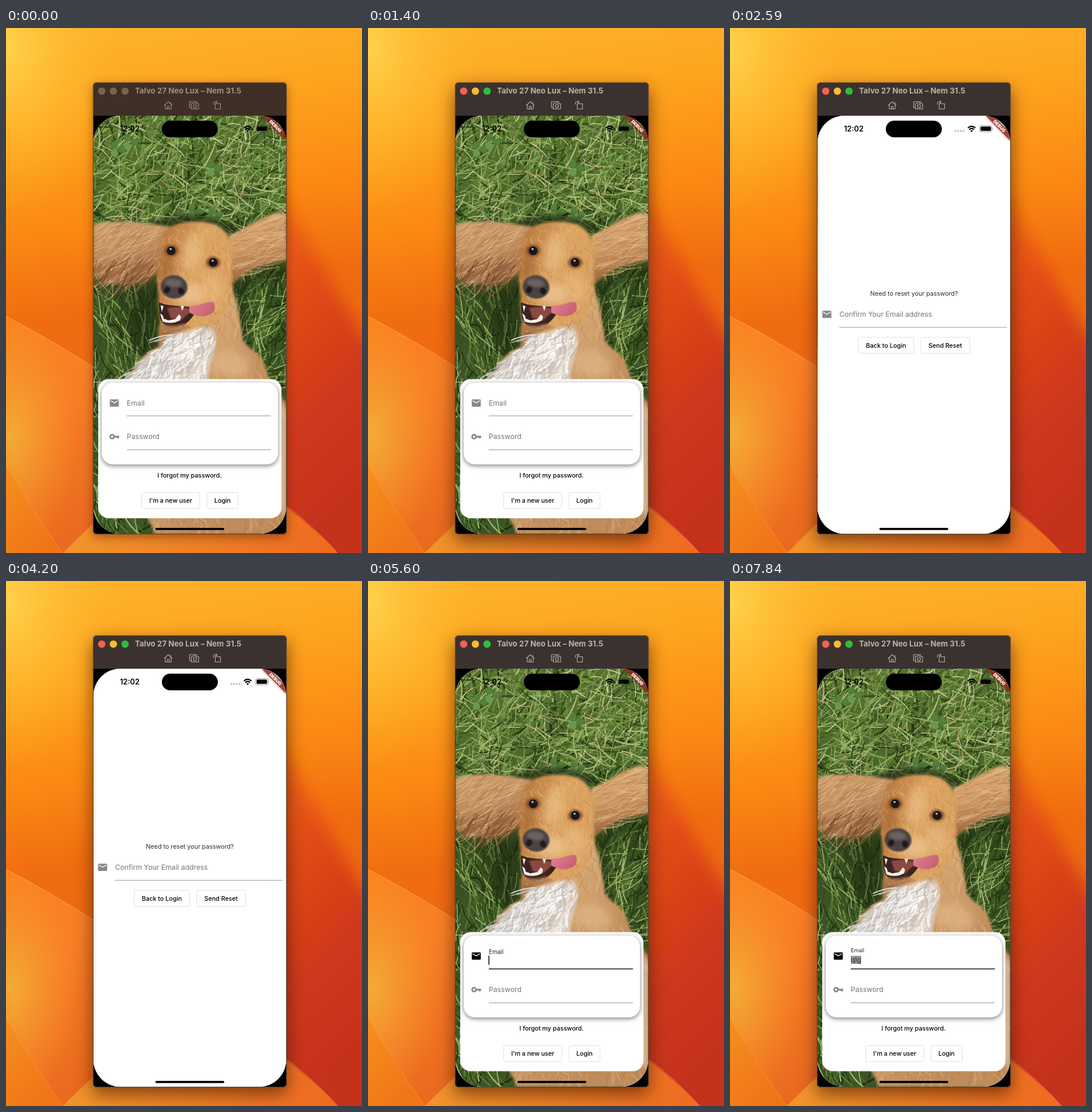
An HTML page with a canvas that plays this animation: 610 by 898 pixels, repeating every 8000 ms.

```html
<!DOCTYPE html>
<html lang="en">
<head>
<meta charset="utf-8">
<title>Login demo</title>
<style>
  html, body { margin: 0; width: 100%; height: 100%; overflow: hidden; background: #f58a18; }
  body { font-family: Inter, Roboto, sans-serif; }
  svg, canvas, div { position: absolute; display: block; left: 0; top: 0; }
  #win { left: 149px; top: 93px; width: 332px; height: 773px; border-radius: 7px; background: #000; overflow: hidden; }
  #screen { left: 1px; top: 57px; width: 330px; height: 715px; border-radius: 46px; overflow: hidden; background: #fff; }
  .page { width: 330px; height: 715px; background: #fff; }
  .field { font-size: 12.1px; fill: #757575; }
  .btn { font-size: 10.6px; font-weight: 500; text-anchor: middle; }
  .box { fill: #fff; stroke: #e0e0e0; }
  .line { stroke: #979797; }
  .card { fill: #fff; filter: drop-shadow(0 3px 3px #0004) drop-shadow(0 1px 4px #0004); }
</style>
</head>
<body>
<svg id="wall" width="610" height="898">
  <defs>
    <linearGradient id="sky" x2=".12" y2="1">
      <stop stop-color="#fdb630"/><stop offset=".2" stop-color="#fea41e"/>
      <stop offset=".4" stop-color="#fb8813"/><stop offset=".56" stop-color="#f06c10"/><stop offset="1" stop-color="#e8601a"/>
    </linearGradient>
    <radialGradient id="sun" cx="0" cy=".04" r=".32">
      <stop stop-color="#ffd24a"/><stop offset="1" stop-color="#ffb52a" stop-opacity="0"/>
    </radialGradient>
    <linearGradient id="red" x2=".3" y2="1">
      <stop stop-color="#f98511"/><stop offset=".2" stop-color="#f26a10"/><stop offset=".42" stop-color="#e34d16"/>
      <stop offset=".7" stop-color="#d03a1a"/><stop offset="1" stop-color="#c4311c"/>
    </linearGradient>
    <linearGradient id="fold" x1=".1" x2=".55" y2="1">
      <stop stop-color="#fa8420"/><stop offset=".4" stop-color="#f87e26"/><stop offset="1" stop-color="#e8671e"/>
    </linearGradient>
    <radialGradient id="glow" cx=".02" cy=".5" r=".5">
      <stop stop-color="#f3ac36"/><stop offset="1" stop-color="#f59a2c" stop-opacity="0"/>
    </radialGradient>
    <linearGradient id="petal" x2=".6" y2="1">
      <stop stop-color="#f6911e"/><stop offset="1" stop-color="#f07418"/>
    </linearGradient>
    <linearGradient id="foot" x2="1">
      <stop stop-color="#f2952c"/><stop offset="1" stop-color="#ee6a20"/>
    </linearGradient>
    <filter id="soft" x="-20%" y="-20%" width="140%" height="140%"><feGaussianBlur stdDeviation="14"/></filter>
  </defs>
  <path fill="url(#sky)" d="M0 0H610V898H0z"/>
  <path fill="url(#sun)" d="M0 0H610V898H0z"/>
  <path fill="url(#red)" filter="url(#soft)" d="M420 180C500 330 560 450 640 565V930H420z"/>
  <path fill="url(#fold)" d="M0 493Q80 535 150 580H240V898H0z"/>
  <path fill="url(#glow)" d="M0 493Q80 535 150 580H240V898H0z"/>
  <path fill="none" stroke="#fbb765" stroke-opacity=".7" d="M0 493Q80 535 150 580"/>
  <path fill="url(#foot)" d="M97 898L240 760H400Q515 840 568 898z"/>
  <path fill="none" stroke="#f98b3c" d="M475 813Q530 855 568 898"/>
  <path fill="url(#petal)" stroke="#f9a640" stroke-opacity=".6" d="M-2 743C30 800 70 860 98 899H-2z"/>
</svg>

<div id="win">
  <svg width="332" height="57" viewBox="149 93 332 57">
    <path fill="#3f2f26" d="M149 93H481V150H149z"/>
    <path class="active" fill="#3b322f" d="M149 93H481V150H149z"/>
    <g fill="#7c6150"><circle cx="164" cy="108" r="6.200"/><circle cx="184" cy="108" r="6.200"/><circle cx="204" cy="108" r="6.200"/></g>
    <g class="active"><circle cx="164" cy="108" r="6.200" fill="#f95f50"/><circle cx="184" cy="108" r="6.200" fill="#fdbb2d"/><circle cx="204" cy="108" r="6.200" fill="#2bbf3c"/></g>
    <g id="bar">
      <text x="221" y="112" font-size="13.200" font-weight="700" fill="#bbb2ad">Talvo 27 Neo Lux – Nem 31.5</text>
      <g fill="none" stroke="#b9afa9" stroke-width="1.1">
        <path d="M271 132.500L278 126L285 132.500M273 131.500V138.500H283V131.500M276.500 138V134H279.500V138M282.500 127V129.500"/>
        <path d="M317 136H314.500V126H327V128M317.500 129.500H320L321 128H325L326 129.500H330V138.500H317.500z"/>
        <circle cx="323.700" cy="133.700" r="2.700"/>
        <path d="M358.500 129.500H367.500V138.500H358.500zM355.500 131V128Q355.500 126.500 357.500 126.500H361M359.500 124.500L361.500 126.500L359.500 128.500"/>
      </g>
    </g>
  </svg>

  <div id="screen">
    <div class="page" id="reset">
      <svg width="330" height="715" viewBox="150 150 330 715">
        <text x="315" y="457.500" text-anchor="middle" font-size="10.600" fill="#2b2b2b">Need to reset your password?</text>
        <use href="#mail" x="-20" y="-151.700" fill="#8b8787"/>
        <text class="field" x="187" y="493.500">Confirm Your Email address</text>
        <path class="line" d="M187 512H474"/>
        <rect class="box" x="219.500" y="529" width="95" height="27.500" rx="2.500"/>
        <rect class="box" x="326.500" y="529" width="84" height="27.500" rx="2.500"/>
        <text class="btn" x="267" y="546.500">Back to Login</text>
        <text class="btn" x="368.500" y="546.500">Send Reset</text>
      </svg>
    </div>

    <div class="page" id="login">
      <canvas id="photo" width="330" height="715"></canvas>
      <svg width="330" height="715" viewBox="150 150 330 715">
        <defs>
          <path id="mail" d="M179.300 635.200H191.800Q193.300 635.200 193.300 636.700V646.200Q193.300 647.700 191.800 647.700H179.300Q177.800 647.700 177.800 646.200V636.700Q177.800 635.200 179.300 635.200zM179.300 638.200L185.500 642.100L191.800 638.200V636.700L185.500 640.600L179.300 636.700z" fill-rule="evenodd"/>
          <clipPath id="tap"><rect x="247" y="751" width="136" height="28" rx="2.500"/></clipPath>
        </defs>
        <path stroke="#ded8cc" d="M150 605.500H480"/>
        <rect x="158" y="600.500" width="314" height="238" rx="18" fill="#fff"/>
        <rect class="card" x="164" y="606.500" width="302" height="140" rx="19"/>
        <use id="mailIcon" href="#mail"/>
        <path fill="none" stroke="#8b8787" stroke-width="2.800" d="M186 699H194M191.500 699V702"/>
        <circle cx="181.800" cy="699" r="3.300" fill="none" stroke="#8b8787" stroke-width="2.800"/>
        <rect id="sel" x="207" y="641" height="14" fill="#999"/>
        <text id="label" x="207">Email</text>
        <text id="typed" x="207" y="652" font-size="12.100" fill="#2e2e2e"></text>
        <rect id="caret" y="641" width="1.500" height="15.500"/>
        <path id="under" d="M207 663.500H454"/>
        <text class="field" x="207" y="703">Password</text>
        <path class="line" d="M207 721.500H454"/>
        <circle id="ripple" cx="307" cy="765" fill="#dfe1e2" clip-path="url(#tap)"/>
        <text class="btn" x="314.500" y="769">I forgot my password.</text>
        <rect class="box" x="232.500" y="794.500" width="99.500" height="27.500" rx="2.500"/>
        <rect class="box" x="344.500" y="794.500" width="53" height="27.500" rx="2.500"/>
        <text class="btn" x="282.300" y="812">I'm a new user</text>
        <text class="btn" x="371" y="812">Login</text>
      </svg>
    </div>

    <svg style="z-index:3" width="330" height="715" viewBox="150 150 330 715">
      <text x="212" y="177.300" text-anchor="middle" font-size="12.700" font-weight="600">12:02</text>
      <rect x="267" y="158.500" width="96" height="28.500" rx="14.250"/>
      <g fill="#8888"><circle cx="385.700" cy="176" r="1.700"/><circle cx="390.500" cy="176" r="1.700"/><circle cx="395.300" cy="176" r="1.700"/><circle cx="400" cy="176" r="1.700"/></g>
      <path fill="none" stroke="#000" stroke-width="2.100" d="M407.500 171Q414 165.200 420.500 171M409.800 173.700Q414 170 418.200 173.700"/>
      <path d="M411.800 175.700Q414 173.800 416.200 175.700L414 178z"/>
      <rect x="427.500" y="166.800" width="21.500" height="11" rx="3.300" fill="none" stroke="#0006"/>
      <rect x="429.300" y="168.600" width="18" height="7.500" rx="1.800"/>
      <path fill="#0006" d="M450 170.500Q451.500 172.300 450 174z"/>
      <path fill="#a52c20cc" style="filter:drop-shadow(0 0 2px #0008)" d="M438 150H451L480 179V193z"/>
      <text transform="translate(461.800 167.800) rotate(45)" y="2.800" text-anchor="middle" font-size="7.600" font-weight="900" fill="#fff">DEBUG</text>
      <rect x="256" y="855" width="118" height="3.800" rx="1.900"/>
    </svg>
  </div>
  <svg width="332" height="773"><rect x=".5" y=".5" width="331" height="772" rx="6.500" fill="none" stroke="#75563a" stroke-opacity=".8"/></svg>
</div>

<script>
const $ = id => document.getElementById(id);
const clamp = x => Math.max(0, Math.min(1, x));

// ---- photo: grass, then the dog from furred shapes ----
const ctx = $('photo').getContext('2d');
let seed = 11;
const rnd = () => (seed = seed * 16807 % 2147483647) / 2147483647;

// Curved hairs or blades; with a path given, only those rooted inside it.
function strands(n, [x, y, w, h], colors, len, angle, spread, width = 1.2, path) {
  for (let i = 0; i < n; i++) {
    const a = angle + (rnd() - .5) * spread, l = len * (.4 + rnd());
    const px = x + rnd() * w, py = y + rnd() * h, bend = (rnd() - .5) * l * .4;
    if (path && !ctx.isPointInPath(path, px - 150, py - 150)) continue;
    const dx = Math.cos(a) * l, dy = Math.sin(a) * l;
    ctx.beginPath();
    ctx.moveTo(px, py);
    ctx.quadraticCurveTo(px + dx / 2 - dy / l * bend, py + dy / 2 + dx / l * bend, px + dx, py + dy);
    ctx.strokeStyle = colors[i % colors.length];
    ctx.lineWidth = width * (.5 + rnd());
    ctx.stroke();
  }
}
function shape(d, fill, blur = 0) {
  ctx.filter = blur ? `blur(${blur}px)` : 'none';
  ctx.fillStyle = fill;
  ctx.fill(new Path2D(d));
  ctx.filter = 'none';
}
function fur(d, fill, alpha, ...hair) {
  shape(d, fill, 2);
  ctx.globalAlpha = alpha;
  strands(...hair, new Path2D(d));
  ctx.globalAlpha = 1;
}
function oval(x, y, rx, ry, color, turn = 0, blur = 0) {
  ctx.filter = blur ? `blur(${blur}px)` : 'none';
  ctx.beginPath();
  ctx.ellipse(x, y, rx, ry, turn, 0, 7);
  ctx.fillStyle = color;
  ctx.fill();
  ctx.filter = 'none';
}
function fade(x0, y0, x1, y1, ...colors) {
  const g = ctx.createLinearGradient(x0, y0, x1, y1);
  colors.forEach((c, i) => g.addColorStop(i / (colors.length - 1), c));
  return g;
}

function drawPhoto() {
  const tan = ['#a9764a', '#dcae7c', '#e9c698', '#bb8750'];
  ctx.translate(-150, -150);
  shape('M150 150H480V865H150z', fade(0, 150, 0, 600, '#57732f', '#4c662c', '#3a5024', '#3c5526'));
  strands(800, [130, 140, 370, 740], ['#20310f', '#2f4719', '#46632a'], 32, -1.2, 2.8, 2.6);
  strands(900, [130, 150, 370, 210], ['#6f8f42', '#8dab5c', '#557a30', '#aebb78', '#2c4317', '#7b9a4c'], 42, -.6, 2.6, 1.7);
  strands(170, [130, 150, 370, 200], ['#d6d4a4', '#a58a5e', '#c3cc92'], 28, -.4, 2.8, 1.1);
  strands(300, [140, 440, 125, 430], ['#5c8038', '#83a152', '#36541f', '#a6b76e', '#24380f'], 58, -1.9, 1.3, 1.7);
  strands(240, [385, 430, 110, 190], ['#5c8038', '#83a152', '#36541f', '#a6b76e', '#24380f'], 46, -.9, 1.9, 1.6);
  for (const [x, y] of [[190, 207], [212, 195], [355, 240], [322, 315], [357, 320]])
    for (let i = 0; i < 3; i++) oval(x + 8 * Math.cos(i * 2.1), y + 8 * Math.sin(i * 2.1), 7, 6, i % 2 ? '#6c974f' : '#557f3c', i, .6);
  shape('M235 340C290 308 360 312 400 345L300 380z', '#18240caa', 5);
  shape('M150 425C200 450 240 445 262 430V545L225 560L200 470z', '#18240c88', 8);
  shape('M388 440L440 408L480 404V425L410 450L415 545L395 520z', '#18240c88', 7);

  fur('M282 340C240 333 190 324 150 338V422C165 432 175 440 195 438C225 442 248 432 264 415z',
    fade(180, 330, 205, 445, '#cfa06f', '#c08d60', '#8a5a38'), .55, 420, [150, 325, 130, 115], tan, 34, 2.5, .8, 1);
  strands(50, [150, 390, 105, 45], ['#6b4226aa', '#8d5d3a99'], 32, 2.3, .8, 1.6);
  fur('M382 356C410 342 440 322 468 316L480 320V396C455 404 432 404 410 420L382 442z',
    fade(410, 320, 435, 430, '#e0b07c', '#cf9a66', '#9a6238'), .55, 380, [380, 310, 100, 120], tan, 34, -.35, .7, 1);
  fur('M214 604C216 577 232 558 262 545V510C290 490 350 450 386 440C396 470 404 510 406 535C414 545 420 550 428 554C442 567 448 585 450 605L480 640V866H258C215 800 200 700 214 604z',
    fade(250, 500, 450, 600, '#bd8650', '#d3a470', '#c08c5a'), .5, 800, [220, 440, 260, 425], tan, 24, 1.4, 1.4, 1.2);
  shape('M262 512L300 512L310 540L270 552z', '#7a4d2a88', 5);
  oval(384, 575, 34, 22, '#e2b98caa', .3, 8);
  shape('M466 640L482 650V840L466 820z', '#e6d3bd99', 4);
  fur('M217 602C222 574 242 556 268 546L274 530C304 512 332 504 352 512C370 530 352 560 345 602z',
    fade(220, 560, 350, 540, '#d5d2d0', '#e8e3df', '#d8c6b2'), .75, 480, [210, 505, 150, 97],
    ['#fff', '#f6f3f1', '#b9b5b4', '#e9e2dc', '#cfc0b0'], 32, 2.2, 1.5, 2);
  fur('M270 349C286 330 330 327 358 336C380 344 390 368 387 400C384 425 392 445 382 472C372 500 350 508 322 514C300 524 266 520 264 500C260 480 264 465 259 442C256 414 264 390 264 364z',
    fade(262, 400, 390, 420, '#b9793f', '#dda461', '#d9a262'), .5, 700, [255, 330, 135, 190],
    ['#c28548', '#e6b879', '#ebc48f', '#b97f45'], 12, 1.3, 1.7, 1);
  oval(306, 452, 34, 19, '#f0cb9baa', .2, 6);
  oval(352, 445, 22, 26, '#eec08888', 0, 8);
  oval(318, 385, 15, 34, '#efc68f99', .2, 7);
  oval(276, 410, 10, 24, '#8f552a66', 0, 6);

  for (const [x, y] of [[283, 381], [355, 401]]) {
    oval(x, y, 12, 10, '#7c4b28', 0, 2);
    oval(x, y, 7.5, 7.5, '#1c1715');
    oval(x - 1, y - 3, 2, 1.6, '#c8d0d6');
  }
  oval(288, 443, 23, 20, '#4c4242', .1, .8);
  oval(287, 436, 15, 7, '#82787699', .1, 2);
  oval(276, 448, 5, 6, '#1d1819', .5, .8);
  oval(300, 450, 5, 6, '#1d1819', -.5, .8);
  shape('M262 469C275 476 300 475 328 478C322 496 306 511 290 514C272 513 264 503 263 490z', '#3a2320', .6);
  shape('M276 479Q300 474 320 482L299 501L282 496z', '#8a4a42', 1);
  shape('M314 474C330 478 344 466 356 469C360 480 356 489 346 491C334 496 324 491 314 487z', fade(320, 470, 350, 495, '#de7d8d', '#c45e70'), .6);
  shape('M265 474L270 476L267 486zM299 475L305 476L302 484zM264 488Q270 491 270 497L278 500L290 498L296 490Q302 492 298 500Q284 508 268 502z', '#f5eee6', .4);
  fur('M264 504Q282 514 304 506L318 512Q292 527 268 517z', '#ad7a4e', .5, 50, [262, 502, 55, 18], tan, 8, .2, .8, 1);
}
drawPhoto();

// ---- motion ----
function ease(x) { // cubic-bezier(.35, .91, .33, .97)
  if (x <= 0 || x >= 1) return clamp(x);
  const bez = (u, a, b) => 3 * u * (1 - u) ** 2 * a + 3 * u * u * (1 - u) * b + u ** 3;
  let lo = 0, hi = 1;
  for (let i = 0; i < 20; i++) {
    const mid = (lo + hi) / 2;
    if (bez(mid, .35, .33) < x) lo = mid; else hi = mid;
  }
  return bez(lo, .91, .97);
}
function slide(under, over, p) {
  over.style.zIndex = 2;
  under.style.zIndex = 1;
  over.style.transform = `translateX(${330 * (1 - p)}px)`;
  under.style.transform = `translateX(${-110 * p}px)`;
}
function set(el, attrs) {
  for (const k in attrs) el.setAttribute(k, attrs[k]);
}

const LOOP = 8000, TICK = 70, SLIDE = 280, WORD = 'qlg', KEYS = [6440, 6790, 7070];

function render(ms) {
  const t = Math.floor(ms % LOOP / TICK) * TICK;

  const on = clamp((t - 1190) / 210);
  document.querySelectorAll('.active').forEach(e => e.style.opacity = on);
  $('bar').style.opacity = .75 + .25 * on;
  $('win').style.boxShadow = `0 0 1px #0008, 0 ${5 + 6 * on}px ${17 + 13 * on}px rgba(50,18,0,${.42 + .2 * on})`;

  if (t < 4410) slide($('login'), $('reset'), ease((t - 2317) / SLIDE));
  else slide($('reset'), $('login'), ease((t - 4235) / SLIDE));
  set($('ripple'), { r: t >= 2170 && t < 4200 ? 10 + (t - 2170) / 6 : 0 });

  const focus = t >= 5600, float = 1 - (1 - clamp((t - 5530) / 210)) ** 3;
  set($('label'), { y: 645.5 - 10.2 * float, 'font-size': 12.1 - 3 * float, fill: focus ? '#222' : '#757575' });
  set($('mailIcon'), { fill: focus ? '#000' : '#8b8787' });
  set($('under'), { stroke: focus ? '#111' : '#979797', 'stroke-width': focus ? 1.6 : 1 });

  const picked = t >= 7560;
  $('typed').textContent = WORD.slice(0, KEYS.filter(k => t >= k).length);
  const width = $('typed').textContent ? $('typed').getComputedTextLength() : 0;
  const blink = t < 6090 ? 1 : t < 6160 ? .5 : t < KEYS[0] ? 0 : 1;
  set($('sel'), { width: picked ? width : 0 });
  set($('caret'), { x: 206.5 + width, opacity: focus && !picked ? blink : 0 });
}

const start = performance.now();
(function loop() {
  render(performance.now() - start);
  requestAnimationFrame(loop);
})();
</script>
</body>
</html>
```
